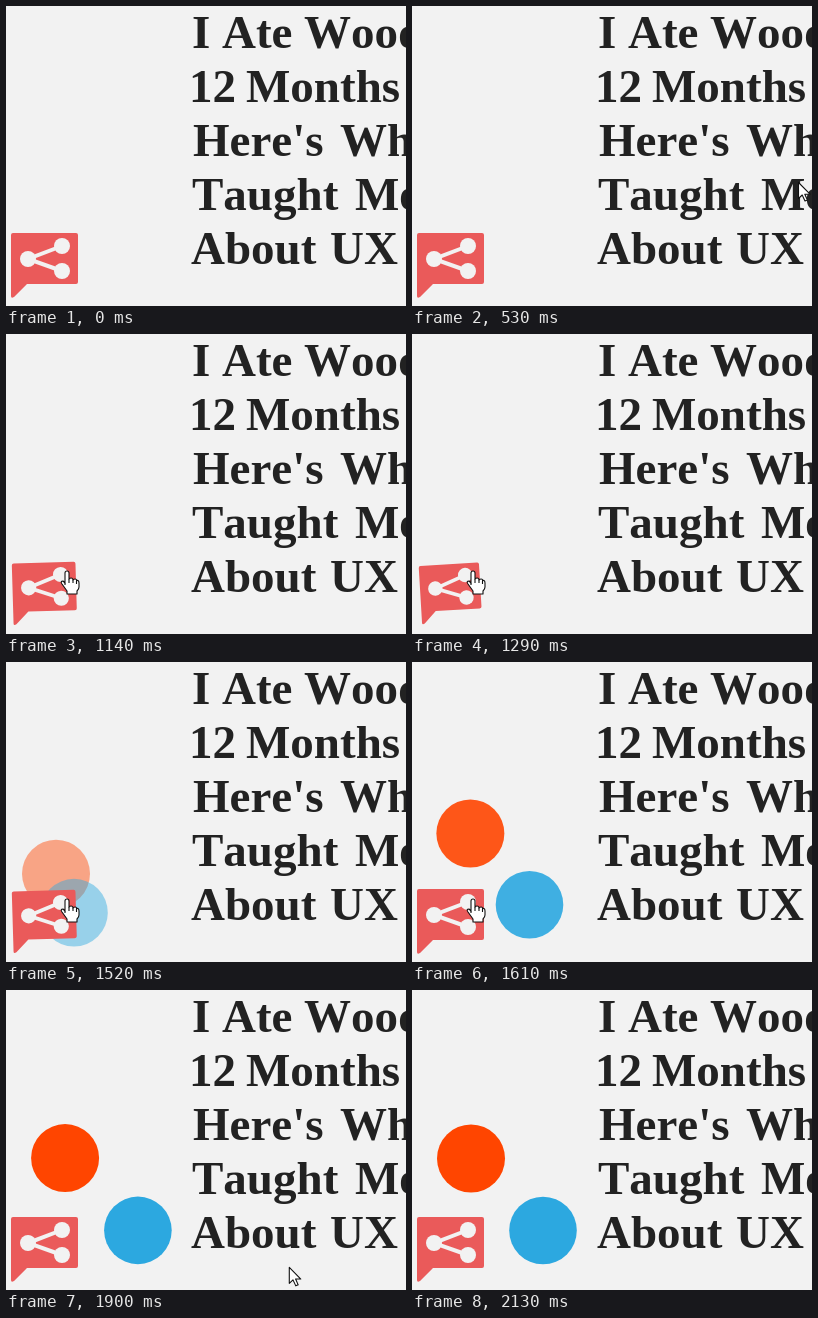
Recreate the animation shown at these times as an HTML page. Size 400 by 300 pixels, loop 2830 ms.

```html
<!DOCTYPE html>
<html lang="en">
<head>
<meta charset="utf-8">
<title>Share button</title>
<style>
  html, body { margin: 0; width: 100%; height: 100%; overflow: hidden; background: #f2f2f2; }
  svg { display: block; width: 100%; height: 100%; }
  text { font: bold 47px "Liberation Serif", serif; font-kerning: none; fill: #222; }
</style>
</head>
<body>
<svg viewBox="0 0 400 300">
  <g id="title"></g>
  <circle id="orange" r="34" fill="#ff4500"/>
  <circle id="blue" r="33.8" fill="#2ca8e0"/>
  <g id="bubble">
    <path d="M7 227H70Q72 227 72 229V276Q72 278 70 278H21L8 291Q5 293 5 290V229Q5 227 7 227Z" fill="#ea5a5a"/>
    <path d="M56 240L22 253L56 265" fill="none" stroke="#f2f2f2" stroke-width="4"/>
    <g fill="#f2f2f2">
      <circle cx="22" cy="253" r="8"/>
      <circle cx="56" cy="240" r="8"/>
      <circle cx="56" cy="265" r="8"/>
    </g>
  </g>
  <g id="cursor" fill="#fff" stroke="#111" stroke-width="1.1" stroke-linejoin="round">
    <path id="arrow" d="M.5 .5V16.5L4.2 13L7 19L9.4 18L6.8 12.2H12Z"/>
    <g id="hand">
      <path d="M-2 2Q-2 0 0 0T2 2V8Q2 7 4 7T6 9Q6 8 8 8T9.5 10Q10 9 11 9.5T12 12V16Q12 18 10 20V23H0V20L-5 13Q-7 10 -4 10L-2 12Z"/>
      <path d="M-2 12V14M2 8V12M6 9V12M9.5 10V13" fill="none"/>
    </g>
  </g>
</svg>
<script>
const LOOP = 2830;
const STEPS = [0, 530, 600, 680, 760, 830, 910, 990, 1060, 1140, 1210, 1290,
  1520, 1610, 1680, 1750, 1830, 1900, 1970, 2050, 2130];
const $ = id => document.getElementById(id);

// word, x, line
const words = [
  ["I", 186, 0], ["Ate", 216, 0], ["Wood", 298, 0],
  ["12", 183, 1], ["Months", 240, 1],
  ["Here's", 187, 2], ["Wh", 334, 2],
  ["Taught", 186, 3], ["Me", 349, 3],
  ["About", 185, 4], ["UX", 324, 4]
];
$("title").innerHTML = words
  .map(([word, x, line]) => `<text x="${x}" y="${41.5 + line * 54}">${word}</text>`)
  .join("");

// linear track through time/value pairs
const track = (...keys) => t => {
  const i = keys.findIndex(k => k[0] > t);
  if (i < 0) return keys[keys.length - 1][1];
  if (i === 0) return keys[0][1];
  const [t0, a] = keys[i - 1], [t1, b] = keys[i];
  return a + (b - a) * (t - t0) / (t1 - t0);
};

const cursorX = track([530, 386], [680, 220], [760, 120], [830, 67.5], [910, 63], [990, 61],
  [1610, 61], [1680, 88], [1750, 134.5], [1970, 352], [2050, 363]);
const cursorY = track([530, 176], [680, 203], [830, 230.5], [990, 237],
  [1610, 237], [1750, 253], [1970, 288], [2050, 293]);
const press = track([990, 0], [1140, .5], [1290, 1], [1520, .5], [1610, 0]);
const orangeOut = track([1520, .5], [1610, .965], [1680, 1.09], [1750, 1.075],
  [1830, 1.03], [1900, 1.005], [1970, 1]);
const blueOut = track([1520, .3], [1610, .85], [1680, 1.06], [1750, 1.094],
  [1830, 1.04], [1900, 1.01], [1970, 1]);
const fade = track([1520, .45], [1610, .9], [1680, 1]);

const move = (el, x, y) => el.setAttribute("transform", `translate(${x} ${y})`);
const show = (el, on) => el.setAttribute("visibility", on ? "visible" : "hidden");

function badge(el, t, out, dx, dy) {
  move(el, 41 + dx * out, 255 + dy * out);
  el.setAttribute("opacity", t < 1520 ? 0 : fade(t));
}

function render(time) {
  const t = STEPS.filter(s => s <= time).pop();
  badge($("orange"), t, orangeOut(t), 18, -86.5);
  badge($("blue"), t, blueOut(t), 90, -14.5);

  const p = press(t);
  $("bubble").setAttribute("transform",
    `translate(38.5 259.5) rotate(${-3.4 * p}) scale(${1 - .1 * p}) translate(-38.5 -259.5)`);

  const visible = t >= 530 && t < 2130;
  const over = t >= 830 && t < 1680;
  move($("cursor"), cursorX(t), cursorY(t));
  show($("arrow"), visible && !over);
  show($("hand"), visible && over);
}

const start = performance.now();
function tick() {
  render((performance.now() - start) % LOOP);
  requestAnimationFrame(tick);
}
tick();
</script>
</body>
</html>
```
